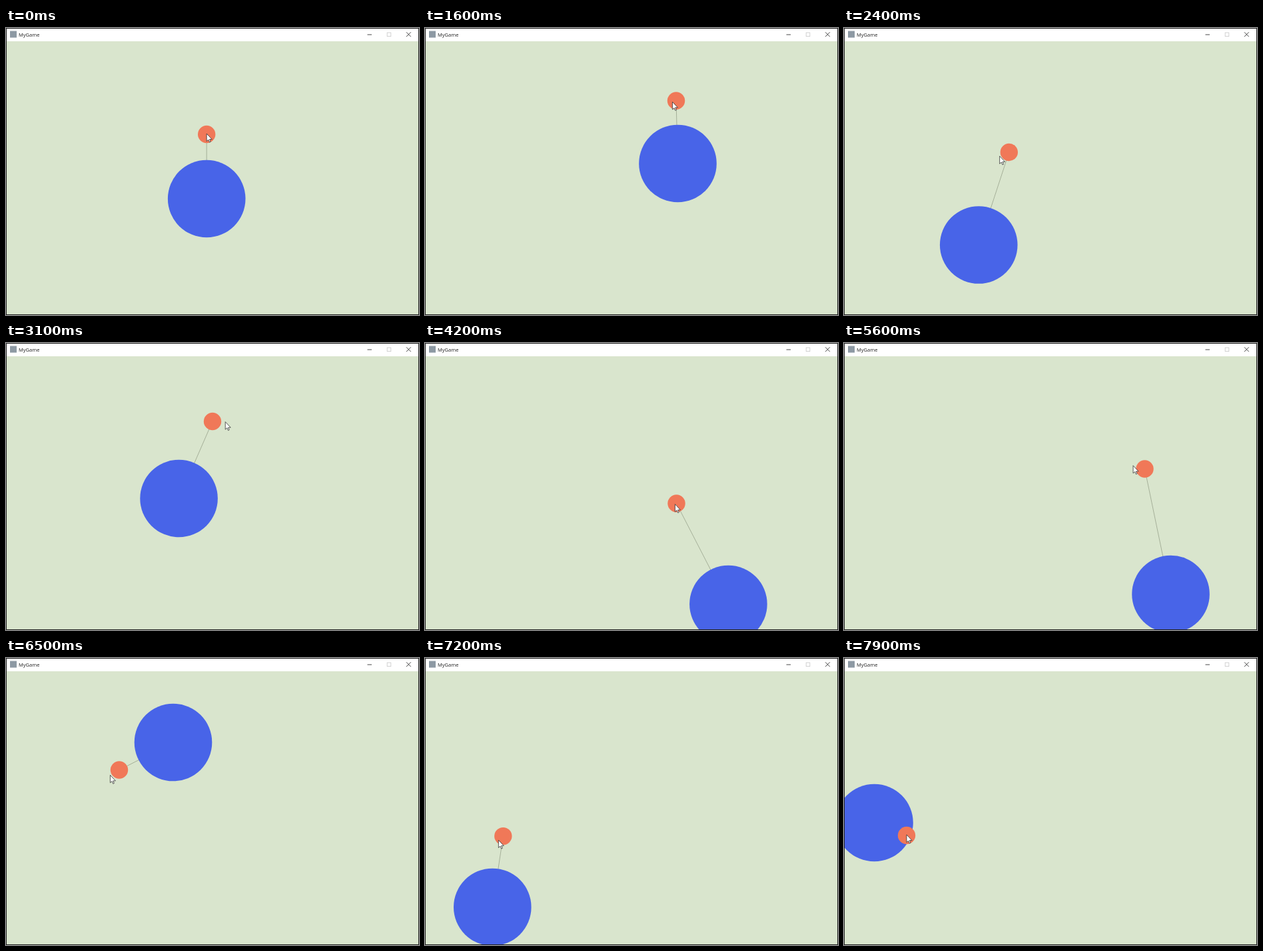
An HTML page that plays this animation: 620 by 432 pixels, repeating every 8 s.

```html
<!DOCTYPE html>
<html lang="en">
<head>
<meta charset="utf-8">
<title>MyGame</title>
<style>
  html, body { margin: 0; height: 100%; overflow: hidden; }
  svg { display: block; }
  text { font: 7.5px "Open Sans", sans-serif; fill: #222; }
</style>
</head>
<body>
<svg width="620" height="432" viewBox="0 0 620 432">
  <rect width="620" height="432" fill="#d9e5cd"/>
  <line id="rope" stroke="#98a38c" stroke-width=".8"/>
  <circle id="ball" r="58.3" fill="#4864e8"/>
  <circle id="handle" r="13.2" fill="#f07858"/>
  <path id="cursor" d="M0 0V11.5L2.6 9.2L4.3 13L6 12.2L4.3 8.6H8Z" fill="#fff" stroke="#333" stroke-width=".8"/>
  <rect width="620" height="20" fill="#fff"/>
  <rect x="6" y="4.5" width="10" height="10" fill="#8d99a3"/>
  <text x="19" y="13">MyGame</text>
  <g fill="none" stroke="#333" stroke-width=".9">
    <path d="M542.5 10H549M601 6.3L607.8 13.1M607.8 6.3L601 13.1"/>
    <rect x="572.2" y="7" width="5.6" height="5.6" stroke="#ccc"/>
    <rect x=".5" y=".5" width="619" height="431" stroke="#222" stroke-width="1"/>
  </g>
</svg>
<script>
const LOOP = 8000, STEP = 100;
const LEAD = 130; // ms by which the cursor runs ahead of the handle

// Pendulum poses: time, handle x, handle y, rope length, rope angle in degrees
const poses = [
  [1100, 301.2, 160, 97, 90],
  [1600, 377, 109.5, 94.5, 88.5],
  [2500, 240, 190, 150, 110],
  [3100, 310, 118, 126.5, 113.5],
  [3650, 410, 205, 150, 80],
  [4200, 377.5, 241.5, 170.4, 62.8],
  [4900, 390, 225, 165, 100],
  [5600, 451.5, 189.5, 192.5, 78.3],
  [6050, 235, 190, 190, 145],
  [6500, 170, 168.5, 91, 332.9],
  [7150, 120, 265, 110, 450],
  [7900, 94, 267, 52.1, 561.4]
];

function slope(i, c) {
  const a = poses[i - 1], b = poses[i + 1];
  return a && b ? (b[c] - a[c]) / (b[0] - a[0]) : 0;
}

// Smooth curve through the poses, at rest before the first
function poseAt(t) {
  if (t <= poses[0][0]) return poses[0];
  const i = poses.findIndex(p => p[0] >= t);
  const a = poses[i - 1], b = poses[i], span = b[0] - a[0], u = (t - a[0]) / span, v = 1 - u;
  return a.map((p, c) =>
    v * v * ((1 + 2 * u) * p + u * span * slope(i - 1, c)) +
    u * u * ((1 + 2 * v) * b[c] - v * span * slope(i, c)));
}

const [rope, ball, handle, cursor] =
  ["rope", "ball", "handle", "cursor"].map(id => document.getElementById(id));

function set(el, attrs) {
  for (const name in attrs) el.setAttribute(name, attrs[name]);
}

function draw(now) {
  const t = Math.floor(now % LOOP / STEP) * STEP;
  const [, x, y, length, degrees] = poseAt(t);
  const [, lastX, lastY] = poseAt(t - 1);
  const angle = degrees * Math.PI / 180;
  const bx = x + length * Math.cos(angle), by = y + length * Math.sin(angle);
  const cx = x + LEAD * (x - lastX), cy = y - 1 + LEAD * (y - lastY);
  set(rope, { x1: x, y1: y, x2: bx, y2: by });
  set(ball, { cx: bx, cy: by });
  set(handle, { cx: x, cy: y });
  set(cursor, { transform: `translate(${cx} ${cy})` });
  requestAnimationFrame(draw);
}
draw(performance.now());
</script>
</body>
</html>
```
